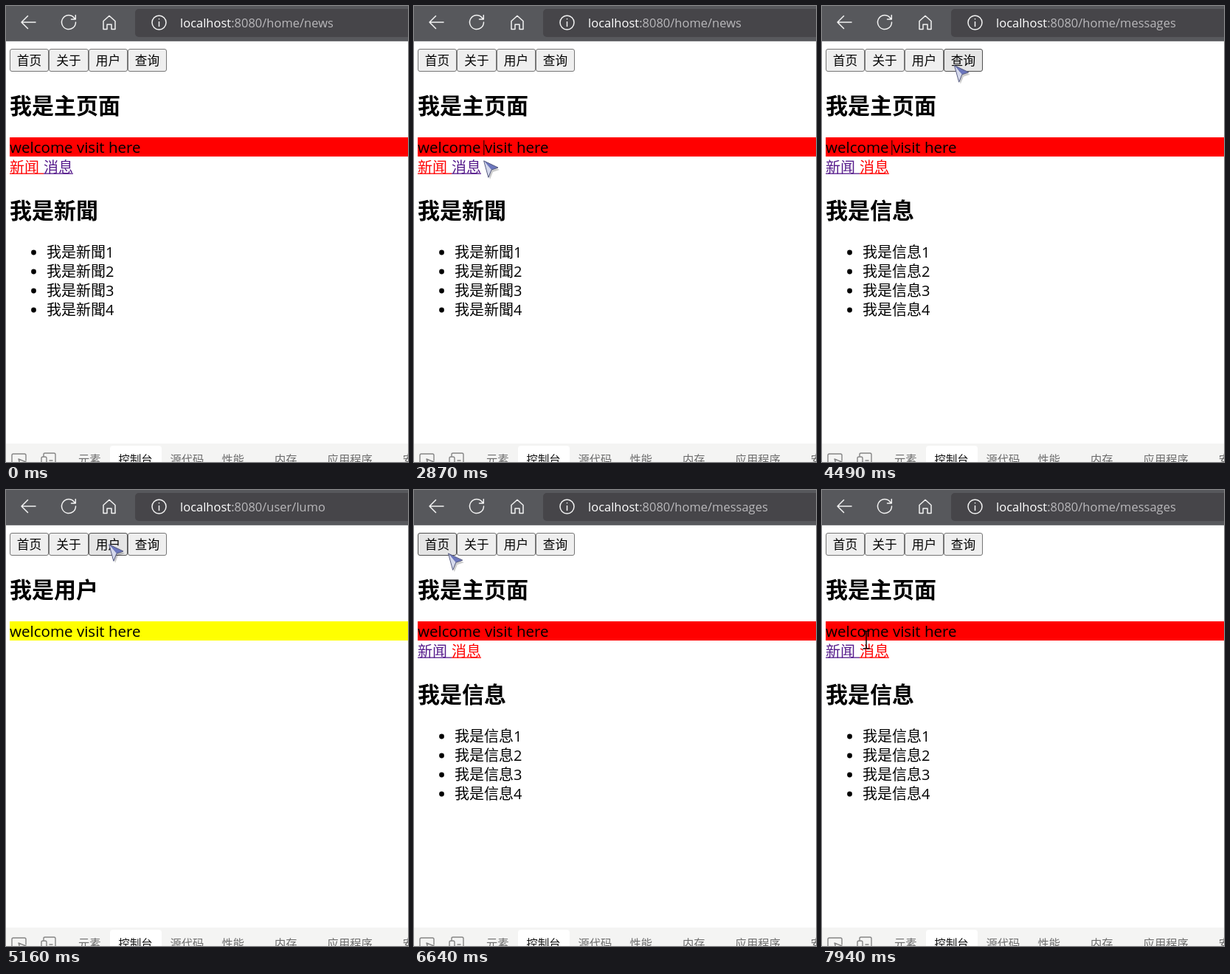
Write an HTML page that moves like this. It is 545 px wide and 618 px high and loops after 8000 ms.

```html
<!DOCTYPE html>
<html lang="zh-CN">
<head>
<meta charset="utf-8">
<title>Router demo</title>
<style>
html, body { margin: 0; width: 100%; height: 100%; overflow: hidden; background: #fff; }
svg { display: block; width: 545px; height: 618px; font-family: "Open Sans", "Noto Sans CJK SC", "Noto Sans CJK", sans-serif; }
text { white-space: pre; }
.line { fill: none; stroke-linecap: round; stroke-linejoin: round; }
</style>
</head>
<body>
<svg viewBox="0 0 545 618">
  <rect width="545" height="618" fill="#fff"/>

  <g id="toolbar">
    <rect width="545" height="47" fill="#57585c"/>
    <rect y="47" width="545" height="1" fill="#77787b"/>
    <rect x="175" y="4" width="380" height="38" rx="5" fill="#464549"/>
    <g class="line" stroke="#f2f2f2" stroke-width="1.5">
      <path d="M40 22H21M29.5 13.5L21 22L29.5 30.5"/>
      <path d="M94.5 22A9.5 9.5 0 1 1 92.500 16.200L94 18M94.300 12.500V18H88.500"/>
      <path d="M132 20.500L140 13.300L148 20.500V31.500H143V25H137V31.500H132Z"/>
      <circle cx="207.5" cy="22.5" r="9.5"/>
      <path d="M207.5 21.5V27.500M207.5 17.500V17.700"/>
    </g>
    <text x="236" y="28.5" font-size="16.5" fill="#b9b8bb"><tspan fill="#fff">localhost</tspan><tspan id="path"></tspan></text>
  </g>

  <g id="buttons" font-size="16.67" text-anchor="middle"></g>

  <text id="title" x="5" y="146" font-size="30" font-weight="700"></text>
  <rect id="bar" x="5" y="178" width="540" height="26"/>
  <text x="5" y="198.5" font-size="20.55">welcome visit here</text>
  <rect id="caret" x="94" y="182" width="1.5" height="20" fill="#5a0000"/>

  <g id="home" font-size="20">
    <g id="newsLink">
      <text x="5" y="225.5">新闻</text>
      <rect x="5" y="226.5" width="46" height="1.3"/>
    </g>
    <g id="msgLink">
      <text x="51" y="225.5">消息</text>
      <rect x="51" y="226.5" width="40" height="1.3"/>
    </g>
    <text id="topic" x="5" y="288" font-size="30" font-weight="700"></text>
    <g id="list"></g>
  </g>

  <g id="status">
    <path d="M0 568H214Q219 568 219 573V592.500H0Z" fill="#f7f7f7" stroke="#d0d0d0"/>
    <text x="5" y="584.5" font-size="14" fill="#5f5f5f">localhost:8080/home/messages</text>
  </g>

  <g id="devtools" font-size="15.3">
    <rect y="593" width="545" height="25" fill="#f4f4f3"/>
    <path d="M141 618V600Q141 596 145 596H207Q211 596 211 600V618Z" fill="#fff"/>
    <g class="line" stroke="#858585" stroke-width="1.4">
      <path d="M14 622H10Q8 622 8 620V609Q8 607 10 607H25Q27 607 27 609V616M17 614L27 618M17 614L20 624"/>
      <path d="M51 610V607.500Q51 606 53 606H65Q67 606 67 608V622M48 622V613Q48 611 50 611H53Q55 611 55 613V622M59 616H63"/>
    </g>
  </g>

  <g id="cursor">
    <g id="arrow">
      <path d="M2 3L21 12L12 15L8 25Z" fill="#000" opacity=".2"/>
      <path d="M0 0L10 12L6 22Z" fill="#d5d9ec"/>
      <path d="M0 0L19 9L10 12Z" fill="#6b76bd"/>
      <path class="line" d="M0 0L19 9L10 12L6 22Z" stroke="#555a80"/>
    </g>
    <path id="beam" class="line" d="M-4-12H-1.500L0-11L1.500-12H4M0-11V11M-4 12H-1.500L0 11L1.500 12H4" stroke="#000" stroke-width="1.4"/>
  </g>
</svg>

<script>
const LOOP = 8000;
const STEP = 68;
const NS = "http://www.w3.org/2000/svg";
const $ = id => document.getElementById(id);

function add(parent, tag, attrs, text = "") {
  const el = document.createElementNS(NS, tag);
  for (const key in attrs) el.setAttribute(key, attrs[key]);
  el.textContent = text;
  return parent.appendChild(el);
}

const show = (id, on) => $(id).setAttribute("visibility", on ? "inherit" : "hidden");
const inside = (p, [x, y, w, h]) => p && p.x >= x && p.x < x + w && p.y >= y && p.y < y + h;

// Each move starts where the last one ended and curves towards its bend.
const entry = [500, 598];
const moves = [
  { start: 780, end: 1540, bend: [261, 258], to: [110, 138] },
  { start: 1610, end: 1960, bend: [75, 84], to: [32, 77] },
  { start: 2380, end: 2870, bend: [80, 130], to: [95, 210] },
  { start: 3070, end: 3220, to: [72, 216] },
  { start: 3500, end: 3810, to: [74, 344] },
  { start: 3880, end: 4620, bend: [225, 112], to: [165, 54] },
  { start: 4690, end: 4830, to: [140, 74] },
  { start: 5700, end: 6300, bend: [66, 63], to: [40, 81] },
  { start: 6440, end: 7190, bend: [50, 64], to: [78, 241] },
  { start: 7250, end: 7940, bend: [40, 210], to: [60, 203] }
];

function pointer(t) {
  const i = moves.filter(m => t >= m.start).length - 1;
  if (i < 0) return null;
  const { start, end, bend, to } = moves[i];
  const from = i ? moves[i - 1].to : entry;
  const steps = Math.round((end - start) / STEP);
  const u = Math.min(1, Math.floor((t - start) / (end - start) * steps + 0.15) / steps);
  const at = axis => {
    const mid = bend ? bend[axis] : (from[axis] + to[axis]) / 2;
    return (1 - u) ** 2 * from[axis] + 2 * u * (1 - u) * mid + u * u * to[axis];
  };
  return { x: at(0), y: at(1) };
}

const edge = i => Math.round(5 + i * 53.3);
const buttons = ["首页", "关于", "用户", "查询"].map((label, i) => {
  const x = edge(i), width = edge(i + 1) - x;
  const el = add($("buttons"), "rect", { x: x + .5, y: 58.5, width: width - 1, height: 30, rx: 2.5 });
  add($("buttons"), "text", { x: x + width / 2, y: 80 }, label);
  return { box: [x, 58, width, 31], el };
});

const items = [0, 1, 2, 3].map(i => {
  const y = 334 + i * 26;
  add($("list"), "circle", { cx: 37.5, cy: y, r: 3.4 });
  return add($("list"), "text", { x: 55, y: y + 7.3 });
});

let tabX = 98;
["元素", "控制台", "源代码", "性能", "内存", "应用程序", "安"].forEach((label, i) => {
  add($("devtools"), "text", { x: tabX, y: 619.5, fill: i === 1 ? "#111" : "#6c6c6c" }, label);
  tabX += label.length * 15.3 + (i < 3 ? 24 : 41);
});

const pages = {
  news: { path: "home/news", title: "我是主页面", topic: "我是新聞", bar: "#f00" },
  messages: { path: "home/messages", title: "我是主页面", topic: "我是信息", bar: "#f00" },
  user: { path: "user/lumo", title: "我是用户", topic: "", bar: "#ff0" }
};
const clicks = { messages: 3366, user: 5105, back: 6505 };

function pageAt(t) {
  if (t < clicks.messages) return "news";
  return t >= clicks.user && t < clicks.back ? "user" : "messages";
}

function drawPage(name) {
  const page = pages[name];
  const linkColor = target => name === target ? "#f00" : "#551a8b";
  $("path").textContent = ":8080/" + page.path;
  $("title").textContent = page.title;
  $("bar").setAttribute("fill", page.bar);
  $("topic").textContent = page.topic;
  items.forEach((el, i) => el.textContent = page.topic + (i + 1));
  show("home", page.topic);
  $("newsLink").setAttribute("fill", linkColor("news"));
  $("msgLink").setAttribute("fill", linkColor("messages"));
}

// Text areas where the pointer turns into a text beam.
const lines = [[5, 118, 150, 34], [5, 178, 178, 27]];
const homeLines = [...lines, [5, 262, 120, 32], [55, 322, 92, 102]];

function drawPointer(p, textAreas) {
  show("cursor", p);
  if (!p) return;
  const overText = textAreas.some(box => inside(p, box));
  show("arrow", !overText);
  show("beam", overText);
  $("cursor").setAttribute("transform", `translate(${p.x} ${p.y})`);
}

function render(t) {
  const name = pageAt(t);
  const p = pointer(t);
  drawPage(name);
  buttons.forEach(({ box, el }) => {
    const hover = inside(p, box);
    el.setAttribute("fill", hover ? "#e5e5e5" : "#efefef");
    el.setAttribute("stroke", hover ? "#4f4f4f" : "#767676");
  });
  show("caret", t >= 2860 && t < clicks.user);
  show("status", t >= 3218 && t < 3660);
  drawPointer(p, name === "user" ? lines : homeLines);
}

function tick() {
  render(performance.now() % LOOP);
  requestAnimationFrame(tick);
}
tick();
</script>
</body>
</html>
```
